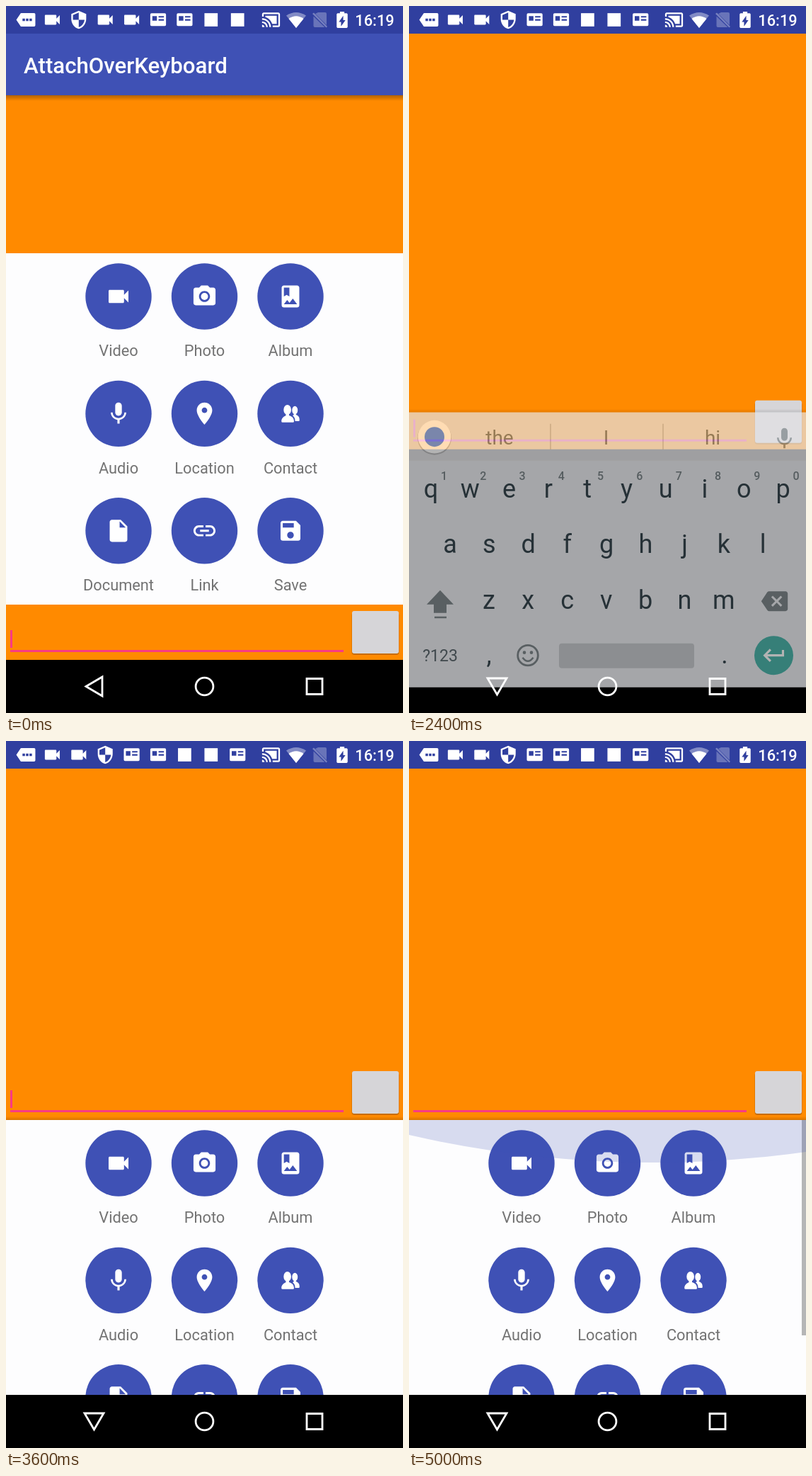
Animation, 561 px wide and 998 px high, one loop 5.1 s. Source, as an HTML page:

```html
<!DOCTYPE html>
<html lang="en">
<head>
<meta charset="utf-8">
<title>AttachOverKeyboard</title>
<style>
  html, body { margin: 0; height: 100%; overflow: hidden; background: #000; }
  svg { display: block; font-family: Roboto, "Noto Sans", sans-serif; }
  #stage { width: 100vw; height: 100vh; }
  .mid { text-anchor: middle; }
</style>
</head>
<body>
<svg id="stage" viewBox="0 0 561 998">
  <defs>
    <linearGradient id="down" x2="0" y2="1"><stop stop-opacity=".3"/><stop offset="1" stop-opacity="0"/></linearGradient>
    <linearGradient id="up" x2="0" y2="1"><stop stop-opacity="0"/><stop offset="1" stop-opacity=".16"/></linearGradient>
    <clipPath id="reveal"><circle id="hole" cx="522"/></clipPath>
  </defs>

  <g id="content">
    <path fill="#ff8a00" d="M0 39H561V923H0z"/>
    <path fill="#3f51b5" d="M0 39H561V126H0z"/>
    <path fill="url(#down)" d="M0 126H561V134H0z"/>
    <text x="25" y="95" font-size="31.2" font-weight="500" fill="#fff">AttachOverKeyboard</text>
    <path fill="#f83b84" d="M6 909H477V912H6z"/>
    <path id="cursor" fill="#f83b84" d="M6 881H9V906H6z"/>
    <rect x="488.5" y="856" width="67" height="60" rx="4" opacity=".22"/>
    <rect x="489" y="854" width="66" height="60" rx="3" fill="#d6d5d8"/>
  </g>

  <g id="keyboard"></g>

  <g clip-path="url(#reveal)">
    <svg id="popup" width="561">
      <path fill="#fdfdfe" d="M0 0H561V496H0z"/>
      <g id="grid"></g>
      <rect id="bar" x="555" width="6" height="304" fill="#b6b6b6"/>
      <circle id="glow" cx="345" r="1550" fill="#3f51b5" opacity=".2"/>
    </svg>
  </g>

  <path fill="#303f9f" d="M0 0H561V39H0z"/>
  <g id="notes0"></g>
  <g id="notes1"></g>
  <g id="system"></g>

  <g fill="none" stroke="#fff" stroke-width="2.8">
    <path id="back" d="M113 960.5L136 947V974z"/>
    <circle cx="280.5" cy="960.5" r="12.4"/>
    <path d="M425 949.5H447V971.5H425z"/>
  </g>
</svg>

<script>
const $ = id => document.getElementById(id);
const LOOP = 5100, STEP = 100, KEYS_H = 388, LIST_H = 496;

const icons = {
  Video: 'M17 10.5V7c0-.55-.45-1-1-1H4c-.55 0-1 .45-1 1v10c0 .55.45 1 1 1h12c.55 0 1-.45 1-1v-3.5l4 4v-11l-4 4z',
  Photo: 'M12 8.8a3.2 3.2 0 1 0 0 6.4 3.2 3.2 0 0 0 0-6.4zM9 2L7.17 4H4c-1.1 0-2 .9-2 2v12c0 1.1.9 2 2 2h16c1.1 0 2-.9 2-2V6c0-1.1-.9-2-2-2h-3.17L15 2H9zm3 15c-2.76 0-5-2.24-5-5s2.24-5 5-5 5 2.24 5 5-2.24 5-5 5z',
  Album: 'M18 2H6c-1.1 0-2 .9-2 2v16c0 1.1.9 2 2 2h12c1.1 0 2-.9 2-2V4c0-1.1-.9-2-2-2zM6 4h5v8l-2.5-1.5L6 12V4zm0 15l3-3.86 2.14 2.58 3-3.86L18 19H6z',
  Audio: 'M12 14c1.66 0 3-1.34 3-3V5c0-1.66-1.34-3-3-3S9 3.34 9 5v6c0 1.66 1.34 3 3 3zm5.3-3c0 3-2.54 5.1-5.3 5.1S6.7 14 6.7 11H5c0 3.41 2.72 6.23 6 6.72V21h2v-3.28c3.28-.48 6-3.3 6-6.72h-1.7z',
  Location: 'M12 2C8.13 2 5 5.13 5 9c0 5.25 7 13 7 13s7-7.75 7-13c0-3.87-3.13-7-7-7zm0 9.5c-1.38 0-2.5-1.12-2.5-2.5s1.12-2.5 2.5-2.5 2.5 1.12 2.5 2.5-1.12 2.5-2.5 2.5z',
  Contact: 'M9.2 4a3.2 4.2 0 0 1 0 9a3.2 4.2 0 0 1 0-9zM16 5.2a2.5 3.6 0 0 1 0 7.4a2.5 3.6 0 0 1 0-7.4zM3.8 19C3.8 15.6 6 14.8 7.8 13.6V11.5h2.9v2.1c2.8 1 4.3 2 4.5 5.4q0 1-1 1H4.8q-1 0-1-1zM14 13.9l1-.9V11.5h2v1.5c2.4 1 3.2 2 3.2 5q0 .8-.8.8H16.2c0-2-.6-3.8-2.2-4.9z',
  Document: 'M6 2c-1.1 0-2 .9-2 2v16c0 1.1.9 2 2 2h12c1.1 0 2-.9 2-2V8l-6-6H6zm7 7V3.5L18.5 9H13z',
  Link: 'M3.9 12c0-1.71 1.39-3.1 3.1-3.1h4V7H7c-2.76 0-5 2.24-5 5s2.24 5 5 5h4v-1.9H7c-1.71 0-3.1-1.39-3.1-3.1zM8 13h8v-2H8v2zm9-6h-4v1.9h4c1.71 0 3.1 1.39 3.1 3.1s-1.39 3.1-3.1 3.1h-4V17h4c2.76 0 5-2.24 5-5s-2.24-5-5-5z',
  Save: 'M17 3H5c-1.11 0-2 .9-2 2v14c0 1.1.89 2 2 2h14c1.1 0 2-.9 2-2V7l-4-4zm-5 16c-1.66 0-3-1.34-3-3s1.34-3 3-3 3 1.34 3 3-1.34 3-3 3zm3-10H5V5h10v4z',
  more: 'M.5 12L6 3.9H22q1.5 0 1.5 1.5V18.6q0 1.5-1.5 1.5H6zM8 10.5v3h3v-3zm4.2 0v3h3v-3zm4.2 0v3h3v-3z',
  shield: 'M12 1L3 5v6c0 5.55 3.84 10.74 9 12 5.16-1.26 9-6.45 9-12V5l-9-4zm0 11h7c-.53 4.12-3.28 7.79-7 8.94V12H5V6.3l7-3.11V12z',
  card: 'M4 4.2H20q1.5 0 1.5 1.5V18q0 1.5-1.5 1.5H4q-1.5 0-1.5-1.5V5.7Q2.5 4.2 4 4.2zM5 7.5V13H10.5V7.5zM12.5 7.5V9.3H19V7.5zM12.5 11.2V13H19V11.2z',
  logo: 'M4 4H20V20H4z',
  cast: 'M1 18v3h3c0-1.66-1.34-3-3-3zm0-4v2c2.76 0 5 2.24 5 5h2c0-3.87-3.13-7-7-7zm18-7H5v1.63c3.96 1.28 7.09 4.41 8.37 8.37H19V7zM1 10v2c4.97 0 9 4.03 9 9h2c0-6.08-4.93-11-11-11zm20-7H3c-1.1 0-2 .9-2 2v3h2V5h18v14h-7v2h7c1.1 0 2-.9 2-2V5c0-1.1-.9-2-2-2z',
  battery: 'M15.67 4H14V2h-4v2H8.33C7.6 4 7 4.6 7 5.33v15.34C7 21.4 7.6 22 8.33 22h7.34c.73 0 1.33-.6 1.33-1.33V5.33C17 4.6 16.4 4 15.67 4zM11 20v-5.5H9L13 7v5.5h2L11 20z',
  enter: 'M19 7v4H5.83l3.58-3.59L8 6l-6 6 6 6 1.41-1.41L5.83 13H21V7z',
  erase: 'M22 3H7c-.69 0-1.23.35-1.59.88L0 12l5.41 8.11c.36.53.9.89 1.59.89h15c1.1 0 2-.9 2-2V5c0-1.1-.9-2-2-2zm-3 12.59L17.59 17 14 13.41 10.41 17 9 15.59 12.59 12 9 8.41 10.41 7 14 10.59 17.59 7 19 8.41 15.41 12 19 15.59z'
};

const icon = (name, x, y, scale = 1.558, fill = '#fff', rule = 'nonzero') =>
  `<path transform="translate(${x} ${y}) scale(${scale}) translate(-12 -12)" fill="${fill}" fill-rule="${rule}" d="${icons[name]}"/>`;
const label = (s, x, y, size, fill, weight = 400) =>
  `<text class="mid" x="${x}" y="${y}" font-size="${size}" fill="${fill}" font-weight="${weight}">${s}</text>`;
const disc = (x, y, r, fill, extra = '') => `<circle cx="${x}" cy="${y}" r="${r}" fill="${fill}" ${extra}/>`;

const actions = ['Video', 'Photo', 'Album', 'Audio', 'Location', 'Contact', 'Document', 'Link', 'Save'];
$('grid').innerHTML = actions.map((name, i) => {
  const x = 159 + i % 3 * 121.5, y = 61 + Math.floor(i / 3) * 165.4;
  return disc(x, y, 46.7, '#3f51b5') + icon(name, x, y) + label(name, x, y + 84.3, 21.8, '#737373');
}).join('');

const row = (chars, x, y, size, fill, weight) =>
  [...chars].map((c, i) => label(c, x + i * 55.28, y, size, fill, weight)).join('');
const ink = '#37474f', gray = '#7f888c';
$('keyboard').innerHTML = `
  <path fill="url(#up)" d="M0 530H561V535H0z"/>
  <path fill="#ebedf1" d="M0 535H561V923H0z"/>
  <path fill="#e3e3e5" d="M0 535H561V603H0z"/>
  <path stroke="#b4b7b9" stroke-width="1.5" d="M200 551V587M359 551V587"/>` +
  disc(36, 571, 24, '#000', 'opacity=".18"') + disc(36, 569.5, 23.3, '#fff') + disc(36, 569.5, 14, '#4285f4') +
  label('the', 128, 580, 28, '#6b7579') + label('I', 278.5, 580, 28, '#6b7579') + label('hi', 429, 580, 28, '#6b7579') +
  icon('Audio', 530.5, 572, 1.5, gray) +
  row('qwertyuiop', 31, 655, 36, ink) + row('1234567890', 49.5, 630, 16, '#7a8488', 500) +
  row('asdfghjkl', 58, 733.5, 36, ink) + row('zxcvbnm', 113, 812, 36, ink) +
  `<path fill="${gray}" d="M44 786L63 806H53V818H35V806H25zM36 823H53V825.5H36z"/>` +
  icon('erase', 516.5, 801.5, 1.558, gray) +
  label('?123', 44, 886.5, 23, '#5d696f') + label(',', 113, 889, 36, ink) + label('.', 446, 889, 36, ink) +
  disc(168, 878, 14.3, 'none', `stroke="${gray}" stroke-width="2.8"`) +
  disc(163, 874, 2.3, gray) + disc(173, 874, 2.3, gray) +
  `<path fill="none" stroke="${gray}" stroke-width="2.5" d="M160.5 881Q168 891 175.5 881"/>
  <rect x="212" y="861" width="191" height="35" rx="4" fill="#c8cbcf"/>` +
  disc(515.5, 878, 27.5, '#4db6ac') + icon('enter', 516, 878);

const notes = names => names.split(' ').map((n, i) =>
  icon(n, 28 + i * 37.4, 19.5, 1.17, '#fff', 'evenodd')).join('');
$('notes0').innerHTML = notes('more Video shield Video Video card card logo logo');
$('notes1').innerHTML = notes('more Video Video shield card card logo logo card');
$('system').innerHTML = icon('cast', 374.5, 19.5, 1.15) +
  `<g fill="#fff">
    <path opacity=".4" d="M410 31L396 13.5Q410 4.5 424 13.5z"/>
    <path d="M410 31L399.5 18Q410 10.5 420.5 18z"/>
    <path opacity=".28" d="M441 9H451Q453 9 453 11V27L437 11zM434.5 14.5L450.5 30H436.5Q434.5 30 434.5 28z"/>
    <path opacity=".35" d="M433 11L435 9.5L454 29L452.5 30.5z"/>
  </g>` +
  `<path transform="translate(475 19.5) scale(1.55 1.15) translate(-12 -12)" fill="#fff" d="${icons.battery}"/>` +
  label('16:19', 521, 28, 21.8, '#fff', 500);

const clamp = v => Math.min(1, Math.max(0, v));
const smooth = p => (1 - Math.cos(Math.PI * clamp(p))) / 2;
const show = (id, on) => $(id).setAttribute('visibility', on ? 'visible' : 'hidden');
const set = (id, name, value) => $(id).setAttribute(name, value);

function draw(t) {
  // Keyboard slides in while the window pans up
  const left = 1 - clamp((t - 2245) / 300);
  const typing = t >= 2245;
  set('content', 'transform', `translate(0 ${-KEYS_H * (1 - left ** 2)})`);
  set('keyboard', 'transform', `translate(0 ${80 * left})`);
  set('keyboard', 'opacity', 1 - left ** 1.66);
  show('keyboard', typing);
  set('back', 'transform', `rotate(${typing ? -90 : 0} 124.5 960.5)`);

  const blink = Math.floor((t - 200 - (t >= 3200 ? 100 : 0)) / 500);
  show('cursor', t < 100 || blink % 2 === 0);
  show('notes0', t < 100);
  show('notes1', t >= 100);

  // Popup opens as a circle growing from the button
  let open = 0;
  if (t < 100) open = 1;
  else if (t < 1600) open = smooth((t - 200) / 400);
  else if (typing) open = smooth((t - 3200) / 400);
  set('popup', 'y', typing ? 535 : 349);
  set('popup', 'height', typing ? KEYS_H : LIST_H);
  set('hole', 'cy', typing ? 496 : 884);
  set('hole', 'r', 750 * open);

  // List is dragged down, back up, then pulled past its top
  const drag = clamp((t - 4295) / 565);
  const scroll = (LIST_H - KEYS_H) * Math.sin(Math.PI * drag);
  set('grid', 'transform', `translate(0 ${-scroll})`);
  set('bar', 'y', scroll * KEYS_H / LIST_H);
  show('bar', t >= 4300);
  const pull = clamp((t - 4850) / 150);
  set('glow', 'cy', 60 * pull - 1550);
  show('glow', pull > 0);
}

const start = performance.now();
function tick() {
  const t = (performance.now() - start) % LOOP;
  draw(Math.floor(t / STEP) * STEP);
  requestAnimationFrame(tick);
}
tick();
</script>
</body>
</html>
```
